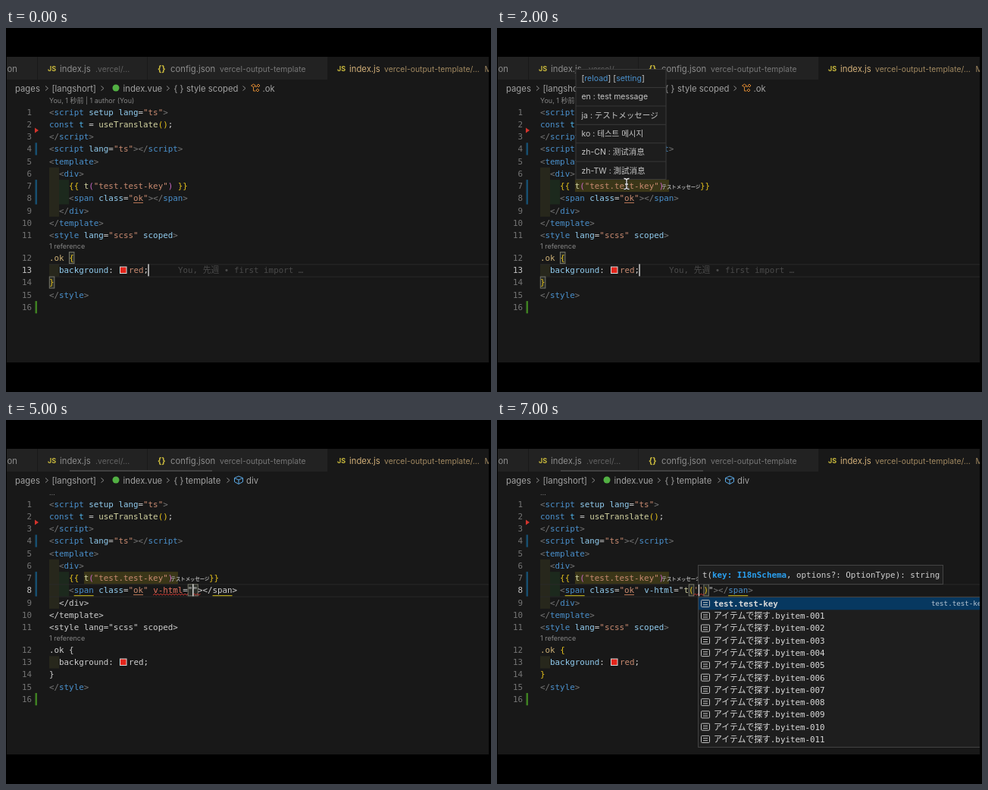
These frames come from a looping animation (640 by 480 pixels, 8000 ms). An HTML page:

```html
<!DOCTYPE html>
<html lang="en">
<head>
<meta charset="utf-8">
<title>Editor translation hints</title>
<style>
html, body { margin: 0; width: 100%; height: 100%; overflow: hidden; background: #000; }
svg { display: block; width: 640px; height: 480px; }
text { white-space: pre; font-family: Inter, "Noto Sans CJK JP", sans-serif; }
.mono { font: 10.85px "DejaVu Sans Mono", "Noto Sans CJK JP", monospace; }
.small { font-size: 9.2px; }
.bold { font-weight: bold; }
.tab { font-size: 11.3px; }
.path { font-size: 10.4px; }
.lens { font-size: 9px; }
.pop { font-size: 10.5px; }
.hint { font-size: 6.4px; font-weight: bold; }
.icon { font-size: 9px; font-weight: bold; }
</style>
</head>
<body>
<svg id="stage" viewBox="0 0 640 480"></svg>
<script>
const STEP = 1000, COUNT = 8;
const LEFT = 57, CHAR = 6.532, ROW = 16.25;
const COLORS = {
  g: '#777', b: '#4a90cc', l: '#92cdf0', o: '#c88a70', w: '#cfcfcf', y: '#e8c31c',
  f: '#d3d3a2', p: '#c969c5', s: '#cdb075', k: '#2aa0f0', n: '#4fb6ee', r: '#e0705c'
};

const col = n => LEFT + n * CHAR;
const rowY = n => (n < 12 ? 110.6 : 124.3) + (n - 1) * ROW;
const esc = s => String(s).replace(/&/g, '&amp;').replace(/</g, '&lt;').replace(/>/g, '&gt;');

const rect = (x, y, w, h, fill, extra = '') =>
  `<rect x="${x}" y="${y}" width="${w}" height="${h}" fill="${fill}" ${extra}/>`;
const path = (d, stroke, width = 1) =>
  `<path d="${d}" fill="none" stroke="${stroke}" stroke-width="${width}"/>`;
const text = (s, x, y, cls, fill, extra = '') =>
  `<text x="${x}" y="${y}" class="${cls}" fill="${fill}" ${extra}>${esc(s)}</text>`;

// "~k" switches to colour k
const rich = (s, x, y, cls = 'mono') => {
  const spans = s.split('~').slice(1).map(t =>
    `<tspan fill="${COLORS[t[0]]}"${t[0] === 'k' ? ' class="bold"' : ''}>${esc(t.slice(1))}</tspan>`);
  return `<text x="${x}" y="${y}" class="${cls}">${spans.join('')}</text>`;
};
const plain = s => '~w' + s.replace(/~./g, '');
const frame = (x, y, w, h, fill, stroke) => rect(x, y, w, h, fill, `stroke="${stroke}"`);
const box = (c, row) => frame(col(c) + .3, rowY(row) - 7.5, CHAR, 15, '#2a2d28', '#77776a');
const caret = (c, row) => rect(col(c) - .3, rowY(row) - 8, 1.4, 16, '#d8d8d8');

function squiggle(c1, c2, row) {
  const y = rowY(row) + 6.5;
  let d = `M${col(c1)} ${y}`;
  for (let x = col(c1), up = 1; x < col(c2); x += 2, up = -up) d += `l2 ${-1.6 * up}`;
  return path(d, '#d83a34');
}

function chrome(scss, scrollbar) {
  const dim = '#777', orange = '#d0ae78';
  let out = rect(1, 38, 636, 403, '#181818') + rect(1, 38, 424, 30, '#222');
  for (const x of [42, 187, 425]) out += rect(x - 1, 38, 1, 30, '#191919');
  out += text('on', 1.5, 58, 'tab', '#8c8c8c')
    + text('JS', 55, 57, 'icon', '#c8b83c') + text('index.js', 71, 58, 'tab', '#8c8c8c')
    + text('.vercel/…', 118, 58, 'path', '#626262')
    + text('{}', 200, 57.5, 'tab bold', '#c8b83c') + text('config.json', 217, 58, 'tab', '#8c8c8c')
    + text('vercel-output-template', 282, 58, 'path', dim)
    + text('JS', 437, 57, 'icon', '#c8b83c') + text('index.js', 453, 58, 'tab', orange)
    + text('vercel-output-template/…', 499, 58, 'path', '#a08860')
    + text('M', 631.5, 58, 'path', '#a08860');
  if (scrollbar) out += rect(84, 66, 188, 2, '#404040');

  const crumb = (s, x) => text(s, x, 83.5, 'tab', '#a2a2a2');
  const arrow = x => path(`M${x} 76.5l3.5 3-3.5 3`, '#8c8c8c');
  out += crumb('pages', 12) + arrow(52) + crumb('[langshort]', 60.5) + arrow(125.5)
    + '<circle cx="145" cy="79" r="4.5" fill="#52b043"/>'
    + crumb('index.vue', 154.5) + arrow(212) + crumb('{ }', 221.5);
  if (scss) {
    out += crumb('style scoped', 238) + arrow(312.5)
      + path('M323.5 76l3-2 3 2-3 2zM326.5 78v5h3M329 77.5h2M330 82l2-2 2 2-2 2zM331 76l2-2 2 2-2 2z', '#d78630')
      + crumb('.ok', 338.5);
  } else {
    out += crumb('template', 237) + arrow(291.5)
      + path('M301.5 76.5l5.5-2.5 5.5 2.5v5l-5.5 3-5.5-3zl5.5 2.5 5.5-2.5M307 79v5', '#5aa9e6')
      + crumb('div', 317);
  }
  return out;
}

const spanLine = (attr, close = '~g></~bspan~g>') =>
  `~g    <~bspan ~lclass~w=~o"ok"${attr}${close}`;

const CODE = [
  '~g<~bscript ~lsetup lang~w=~o"ts"~g>',
  '~bconst ~nt ~w= ~fuseTranslate~y()~w;',
  '~g</~bscript~g>',
  '~g<~bscript ~llang~w=~o"ts"~g></~bscript~g>',
  '~g<~btemplate~g>',
  '~g  <~bdiv~g>',
  '~y    {{ ~ft~p(~o"test.test-key"~p)',
  '',
  '~g  </~bdiv~g>',
  '~g</~btemplate~g>',
  '~g<~bstyle ~llang~w=~o"scss" ~lscoped~g>',
  '~s.ok ~y{',
  '~l  background~w:',
  '~y}',
  '~g</~bstyle~g>',
  ''
];

function editor({ line, span, attr = 0, hint, lens, blame, pale, marks = '' }) {
  const olive = '#27271c', green = '#1c291d';
  let out = rect(LEFT, rowY(6) - 8, 13, 4 * ROW, olive) + rect(70, rowY(7) - 8, 13, 2 * ROW, green)
    + rect(LEFT, rowY(13) - 8, 13, ROW, olive);
  const top = rowY(line) - 8;
  out += rect(LEFT, top, 580, 1, '#292929') + rect(LEFT, top + ROW, 580, 1, '#292929');
  if (hint) out += rect(103, rowY(7) - 8, 124, 16, '#3a3618');
  out += marks;

  const blue = '#174e70';
  out += rect(38.5, rowY(4) - 8, 2.5, ROW, blue) + rect(38.5, rowY(7) - 8, 2.5, 2 * ROW, blue)
    + rect(38.5, rowY(16) - 8, 2.5, ROW, '#3f8122') + '<path d="M38 131.5l5 3.5-5 3.5z" fill="#d3342c"/>';

  CODE.forEach((code, i) => {
    const n = i + 1, y = rowY(n) + 3.9;
    out += text(n, 34, y, 'mono', n === line ? '#c4c4c4' : '#757575', 'text-anchor="end"');
    const s = n === 8 ? span : code;
    if (s) out += rich(pale && n > 8 && n < 15 ? plain(s) : s, LEFT, y);
  });
  out += text('}}', hint ? 268 : col(26), rowY(7) + 3.9, 'mono', COLORS.y);
  if (hint) out += text('テストメッセージ', 217.5, rowY(7) + 3.6, 'hint', '#a5a5a5');

  out += frame(150.5, 315, 8.5, 8.5, '#e3251b', '#d8d8d8')
    + rich(pale ? '~wred;' : '~ored~w;', 162, rowY(13) + 3.9);
  out += rect(168, 230, 13, 1, '#b87555');
  if (attr) {
    out += rect(col(5), 231, 26, 1.2, '#b5a51c') + rect(col(attr), 231, 26, 1.2, '#b5a51c');
  }
  out += text(lens ? 'You, 1 秒前 | 1 author (You)' : '…', LEFT, 99, 'lens', '#858585')
    + text('1 reference', LEFT, 291, 'lens', '#858585');
  if (blame) out += text(blame[1], blame[0], rowY(line) + 3.9, 'mono', '#4a4a4a');
  return out;
}

function hover() {
  const rows = ['en : test message', 'ja : テストメッセージ', 'ko : 테스트 메시지',
    'zh-CN : 测试消息', 'zh-TW : 測試消息'];
  let out = frame(104, 54.5, 119, 145, '#1d1d1d', '#3a3a3a')
    + rich('~w[~breload~w] [~bsetting~w]', 111.5, 70, 'pop');
  rows.forEach((s, i) => {
    const y = 78 + i * 24.4;
    out += rect(104, y, 119, 1, '#383838') + text(s, 111.5, y + 16.2, 'pop', '#c6c6c6');
  });
  const beam = 'M167.5 198.5q3.5 0 3.5 2.5q0-2.5 3.5-2.5M171 201v9M167.5 212.5q3.5 0 3.5-2.5q0 2.5 3.5 2.5M169 206h4';
  return out + path(beam, '#222', 3) + path(beam, '#e4e4e4', 1.3);
}

function suggestions() {
  let out = frame(265.5, 191.5, 323, 25, '#1e1e1e', '#434343')
    + rich('~wt(~kkey: I18nSchema~w, options?: OptionType): string', 271, 207.5)
    + frame(265.5, 233.5, 380, 198, '#1e1e1e', '#434343')
    + rect(266, 234, 371, 16.3, '#073860');
  for (let i = 0; i < 12; i++) {
    const y = 242 + i * 16.27;
    const label = i ? 'アイテムで探す.byitem-' + String(i).padStart(3, '0') : 'test.test-key';
    out += rect(269.5, y - 4.5, 11, 9, 'none', 'rx="1" stroke="#c0c0c0"')
      + path(`M272 ${y - 1.3}h6M272 ${y + 1.7}h6`, '#c0c0c0')
      + text(label, 286, y + 3.9, i ? 'mono' : 'mono bold', '#dadada');
  }
  return out + text('test.test-key', 573, 245.3, 'mono small', '#b5c4d2');
}

const brackets = box(4, 12) + box(0, 14);
const styleView = { line: 13, span: spanLine(''), lens: true,
  blame: [227, 'You, 先週 • first import …'], marks: brackets };
const typing = (attr, end, more) => ({ line: 8, hint: true, span: spanLine(attr), attr: end, ...more });

const scenes = [
  chrome(true) + editor(styleView) + caret(20, 13),
  chrome(true) + editor({ ...styleView, hint: true }) + caret(20, 13),
  chrome(true) + editor({ ...styleView, hint: true }) + caret(20, 13) + hover(),
  chrome(false) + editor({ line: 8, hint: true, lens: true, span: spanLine(''),
    blame: [279, 'You, 14 秒前 • Uncommitted changes'] }),
  chrome(false) + editor(typing(' ~lv-', 26)) + caret(23, 8),
  chrome(false, true) + editor({ line: 8, hint: true, pale: true, attr: 33,
    span: spanLine(' ~rv-html~w=""', '~w></span>'), marks: box(28, 8) + box(29, 8) })
    + squiggle(21, 28, 8) + squiggle(29, 30.5, 8) + caret(29, 8),
  chrome(false, true) + editor(typing(' ~lv-html~w="~ft~w"', 34,
    { marks: rect(col(29), 217, CHAR, 15, '#3b3b3b') })) + caret(30, 8),
  chrome(false, true) + editor(typing(` ~lv-html~w="~ft~y(~o''~y)~w"`, 38,
    { marks: box(30, 8) + box(33, 8) })) + squiggle(31, 33, 8) + caret(32, 8) + suggestions()
];

const stage = document.getElementById('stage');
stage.innerHTML = '<clipPath id="view"><rect x="1" y="38" width="636" height="403"/></clipPath>'
  + scenes.map(s => `<g class="scene" clip-path="url(#view)" display="none">${s}</g>`).join('');
const groups = stage.querySelectorAll('.scene');

const start = performance.now();
let shown = -1;
function draw() {
  const i = Math.floor((performance.now() - start) / STEP) % COUNT;
  if (i !== shown) {
    groups.forEach((g, n) => g.setAttribute('display', n === i ? 'inline' : 'none'));
    shown = i;
  }
  requestAnimationFrame(draw);
}
draw();
</script>
</body>
</html>
```
